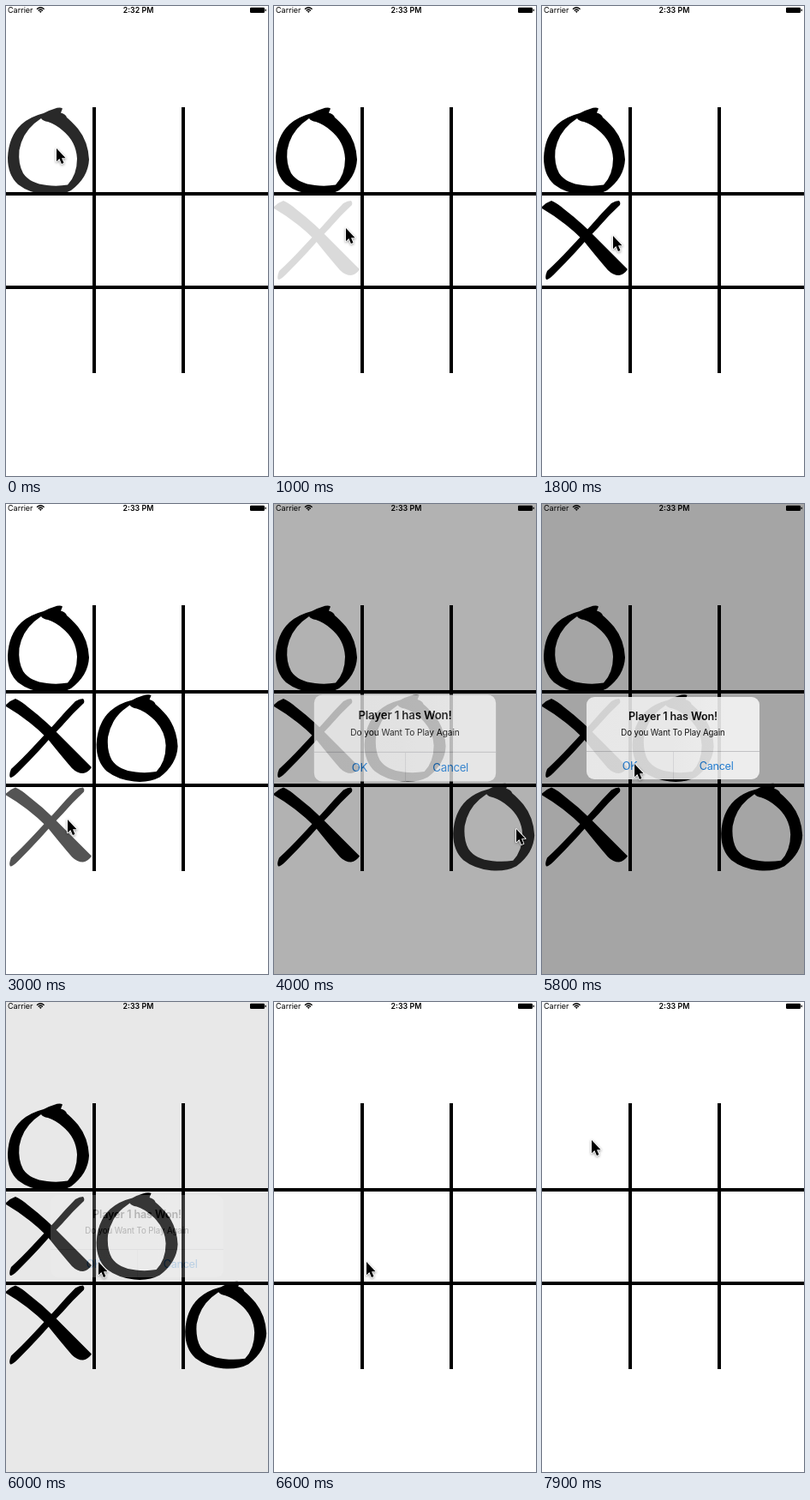
These frames come from a looping animation (306x548 px, 8000 ms). An HTML page:

```html
<!DOCTYPE html>
<html lang="en">
<head>
<meta charset="utf-8">
<title>Tic-tac-toe</title>
<style>
  html, body { margin: 0; width: 100%; height: 100%; overflow: hidden; background: #fff; }
  svg { display: block; width: 100vw; height: 100vh; }
  text { font-family: Inter, Roboto, "Liberation Sans", sans-serif; }
  .mid { text-anchor: middle; }
  .title { font-size: 12.6px; font-weight: 600; letter-spacing: -.15px; }
  .note { font-size: 9.7px; letter-spacing: -.08px; }
  .action { font-size: 12.7px; letter-spacing: -.33px; fill: #1479d8; }
  .status { font-size: 9px; }
  .clock { font-size: 8.9px; font-weight: 600; }
  #cursor { filter: drop-shadow(0 1.5px 1.5px rgba(0, 0, 0, .4)); }
</style>
</head>
<body>
<svg viewBox="0 0 306 548">
  <defs>
    <path id="o" fill-rule="evenodd" d="M66 119.5Q63 117.5 56 120Q49 122 44 125Q28 129 18 138Q3 152 2 177Q2 197 14 208Q27 218 46 220Q64 221.500 76 215Q96 200 97 179Q96 158 84 143Q76 134 71 130Q70 126 64 124.500Z
      M41 131Q43 134 49 135Q58 138 66 145Q82 158 83 178Q83 197 72 208.500Q60 210.500 48 209Q28 207 20 195Q14 184 15.500 168Q19 149 33 137Z"/>
    <g id="x">
      <path d="M0 234Q5 229 11 227Q18 230 26 237Q43 250 57 264Q73 280 86 293L100 307Q96 313 90 314Q83 314 77 308Q64 293 48 273Q26 251 0 236Z"/>
      <path d="M81 230Q86 227 90 227Q92 229 91 232Q78 244 66 258Q53 271 40 286Q28 299 14 313Q8 319 5 319Q3 316 6 309Q18 298 32 283Q47 267 58 255Q70 241 81 230Z"/>
    </g>
    <linearGradient id="glass">
      <stop offset="0" stop-color="#f1f1f1"/>
      <stop offset=".5" stop-color="#f3f3f3"/>
      <stop offset=".8" stop-color="#f8f8f8"/>
    </linearGradient>
  </defs>

  <rect width="306" height="548" fill="#fff"/>
  <path d="M0 219H306M0 328H306M103 118V428M207 118V428" stroke="#000" stroke-width="4"/>
  <g id="pieces"></g>
  <rect id="dim" width="306" height="548"/>

  <text class="status" x="2" y="8">Carrier</text>
  <path d="M36 3.700Q40.300 -.2 44.600 3.700M37.700 5.500Q40.300 3.100 42.900 5.500" fill="none" stroke="#000" stroke-width="1.3"/>
  <path d="M38.800 6.300Q40.300 5.200 41.800 6.300L40.300 8Z"/>
  <text id="clock" class="clock mid" x="154.500" y="8"></text>
  <rect x="285" y="1.700" width="17" height="6.300" rx="1.300"/>
  <rect x="302.600" y="3.600" width="1.200" height="2.600" rx=".6"/>

  <g id="alert">
    <rect x="52" y="225" width="202" height="96" rx="9" fill="url(#glass)"/>
    <path d="M52 288.500H254" stroke="#c2c2c5" stroke-width=".9"/>
    <path d="M153.500 289V321" stroke="#d6d6d8" stroke-width=".8"/>
    <text class="title mid" x="153" y="252">Player 1 has Won!</text>
    <text class="note mid" x="153" y="270.300">Do you Want To Play Again</text>
    <text class="action mid" x="102.500" y="310">OK</text>
    <text class="action mid" x="203.600" y="310">Cancel</text>
  </g>

  <g id="cursor">
    <path d="M0 0V14.300L3.200 11.400L5.600 17L8 16L5.700 10.500H10Z" transform="scale(1.06)" stroke="#fff" stroke-width="1.600" stroke-linejoin="round" paint-order="stroke"/>
  </g>
</svg>
<script>
const LOOP = 8000, STEP = 100, FADE = 350, CELL = 103.6;
const OPEN = 3750, CLOSE = 5780, RESET = 6150;

// shape, column, row (relative to where the shape is drawn), start of fade-in
const moves = [
  ["o", 0, 0, -294],
  ["x", 0, 0, 950],
  ["o", 1, 1, 2150],
  ["x", 0, 1, 2766],
  ["o", 2, 2, 3713]
];

// time, x, y of the pointer tip
const path = [
  [0, 59, 166], [100, 59, 166], [800, 84, 259], [1000, 84, 259], [1500, 83, 268],
  [1800, 83, 268], [2000, 152, 279], [2400, 152, 279], [2800, 72, 368],
  [3000, 72, 368], [3400, 283, 379], [4000, 283, 379], [4500, 164, 349],
  [4600, 148, 325], [4900, 108, 303], [7100, 108, 303], [7800, 58, 161], [8000, 58, 161]
];

const $ = id => document.getElementById(id);
const clamp = v => Math.max(0, Math.min(1, v));
const smooth = p => p * p * (3 - 2 * p);

const pieces = moves.map(([shape, col, row, start]) => {
  const el = document.createElementNS("http://www.w3.org/2000/svg", "use");
  el.setAttribute("href", "#" + shape);
  el.setAttribute("transform", `translate(${col * CELL} ${row * CELL})`);
  $("pieces").append(el);
  return { el, start };
});

function pointer(t) {
  const i = path.findIndex(k => k[0] > t);
  const [t0, x0, y0] = path[i - 1], [t1, x1, y1] = path[i];
  const p = smooth((t - t0) / (t1 - t0));
  return [x0 + (x1 - x0) * p, y0 + (y1 - y0) * p];
}

function alertLevel(t) {
  if (t < OPEN || t >= 6600) return 0;
  if (t < CLOSE) return t >= 4700 ? 1 : 1 - Math.exp((OPEN - t) / 183);
  return Math.exp((CLOSE - t) / 145);
}

function draw(t) {
  const left = 1 - clamp((t - RESET) / FADE);
  for (const { el, start } of pieces) {
    el.setAttribute("opacity", clamp((t - start) / FADE) * left);
  }

  const level = alertLevel(t);
  const scale = t < CLOSE ? 1.2 - 0.2 * level : 1;
  $("dim").setAttribute("opacity", 0.405 * level);
  $("alert").setAttribute("opacity", level);
  $("alert").setAttribute("transform", `translate(153 273) scale(${scale}) translate(-153 -273)`);

  $("clock").textContent = t < 400 ? "2:32 PM" : "2:33 PM";
  $("cursor").setAttribute("transform", `translate(${pointer(t)})`);
}

const begin = performance.now();
function tick() {
  const t = (performance.now() - begin) % LOOP;
  draw(Math.floor(t / STEP) * STEP);
  requestAnimationFrame(tick);
}
tick();
</script>
</body>
</html>
```
